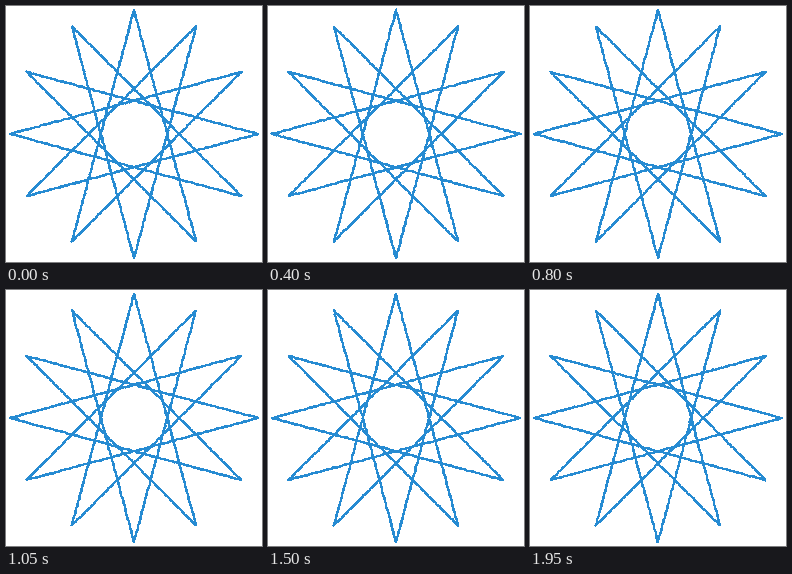
An HTML page that plays this animation: 256 by 256 pixels, repeating every 2000 ms.

```html
<!DOCTYPE html>
<html lang="en">
<head>
<meta charset="utf-8">
<title>Twelve-pointed star</title>
<style>
  html, body { margin: 0; width: 100%; height: 100%; overflow: hidden; background: #fff; }
  svg { display: block; width: 100%; height: 100%; }
  polygon {
    fill: none;
    stroke: #268bd2;
    stroke-width: 2.5;
    stroke-linejoin: round;
    shape-rendering: crispEdges;
  }
</style>
</head>
<body>
<svg viewBox="0 0 256 256"><polygon id="star"/></svg>
<script>
const LOOP = 2000, STEP = 50;
const POINTS = 12, SKIP = 5, CENTER = 128, RADIUS = 124;
const PIECES = 120, ROUGHNESS = 0.45;
const star = document.getElementById('star');

// Repeatable noise in -1..1
function createNoise(seed) {
  let state = seed * 7919 + 17;
  return () => {
    state = (Math.imul(state, 1664525) + 1013904223) >>> 0;
    return state / 2 ** 31 - 1;
  };
}

function corner(i) {
  const angle = (i * SKIP / POINTS) * 2 * Math.PI - Math.PI / 2;
  return [CENTER + RADIUS * Math.cos(angle), CENTER + RADIUS * Math.sin(angle)];
}

// The star stands still while the grain along its edges changes every step
function draw(time) {
  const noise = createNoise(Math.floor((time % LOOP) / STEP));
  const points = [];
  for (let i = 0; i < POINTS; i++) {
    const [x0, y0] = corner(i);
    const [x1, y1] = corner(i + 1);
    for (let k = 0; k < PIECES; k++) {
      const t = k / PIECES;
      const x = x0 + (x1 - x0) * t + ROUGHNESS * noise();
      const y = y0 + (y1 - y0) * t + ROUGHNESS * noise();
      points.push(x.toFixed(2) + ',' + y.toFixed(2));
    }
  }
  star.setAttribute('points', points.join(' '));
}

const start = performance.now();
function tick() {
  draw(performance.now() - start);
  requestAnimationFrame(tick);
}
draw(0);
requestAnimationFrame(tick);
</script>
</body>
</html>
```
